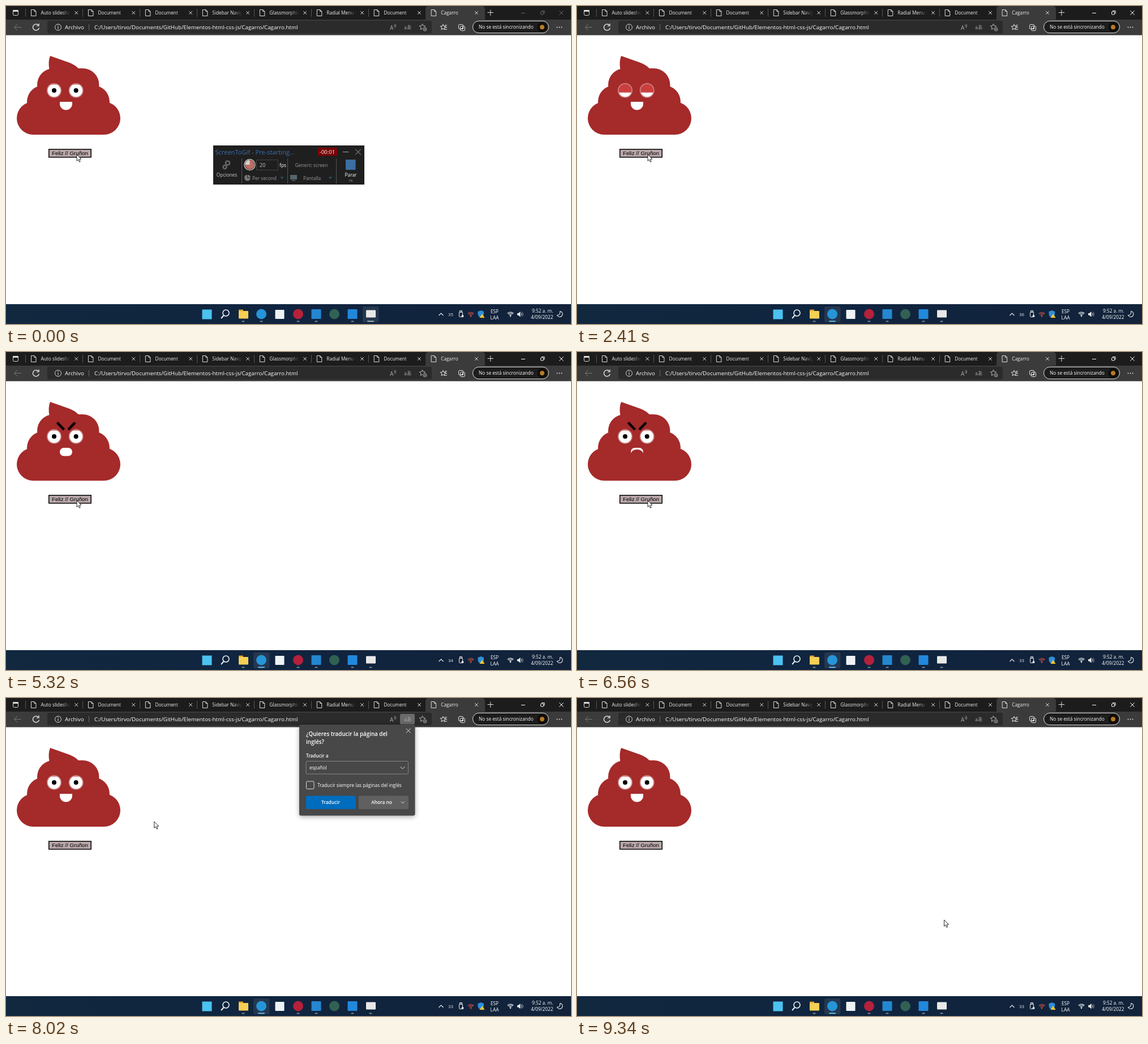
An HTML page with a canvas for the animation above (9.49 s loop, 998x561 px).

```html
<!DOCTYPE html>
<html lang="es">
<head>
<meta charset="utf-8">
<title>Cagarro</title>
<style>
html, body { margin: 0; width: 100%; height: 100%; overflow: hidden; background: #fff; }
canvas { display: block; }
</style>
</head>
<body>
<canvas id="stage" width="998" height="561"></canvas>
<script>
const screen2d = document.getElementById('stage').getContext('2d');
const layer = new OffscreenCanvas(998, 561);
const layer2d = layer.getContext('2d');
let ctx = screen2d;

const LOOP = 9490;
const UI = '"Open Sans", "Noto Sans", sans-serif';
const BROWN = '#a52a2a';
const BLINKS = [2060, 5950, 8690];
const CLICKS = [2960, 6760, 8830];

const clamp = v => Math.max(0, Math.min(1, v));
const ramp = (t, from, to) => clamp((t - from) / (to - from));
const within = (t, from, to) => t >= from && t < to;

function rect(x, y, w, h, fill, r = 0) {
  ctx.beginPath();
  ctx.roundRect(x, y, w, h, r);
  ctx.fillStyle = fill;
  ctx.fill();
}

function frame(x, y, w, h, color, r = 0, lw = 1) {
  ctx.beginPath();
  ctx.roundRect(x, y, w, h, r);
  stroke(color, lw);
}

function stroke(color, lw) {
  ctx.strokeStyle = color;
  ctx.lineWidth = lw;
  ctx.stroke();
}

function disc(x, y, r, fill) {
  ctx.beginPath();
  ctx.arc(x, y, r, 0, 7);
  ctx.fillStyle = fill;
  ctx.fill();
}

function ring(x, y, r, color, lw = 1, a = 0, b = Math.PI * 2) {
  ctx.beginPath();
  ctx.arc(x, y, r, a, b);
  stroke(color, lw);
}

function line(color, lw, ...pts) {
  ctx.beginPath();
  for (let i = 0; i < pts.length; i += 2) ctx.lineTo(pts[i], pts[i + 1]);
  stroke(color, lw);
}

function path(d, fill) {
  ctx.fillStyle = fill;
  ctx.fill(new Path2D(d));
}

function text(s, x, y, color = '#fff', size = 8.3, weight = 400, align = 'left', family = UI) {
  ctx.font = `${weight} ${size}px ${family}`;
  ctx.textAlign = align;
  ctx.fillStyle = color;
  ctx.fillText(s, x, y);
}

function cross(x, y, r, color, lw = 1) {
  line(color, lw, x - r, y - r, x + r, y + r);
  line(color, lw, x + r, y - r, x - r, y + r);
}

function star(x, y, r, color) {
  ctx.beginPath();
  for (let i = 0; i < 10; i++) {
    const a = i * Math.PI / 5 - Math.PI / 2, d = i % 2 ? r * 0.48 : r;
    ctx.lineTo(x + d * Math.cos(a), y + d * Math.sin(a));
  }
  ctx.closePath();
  stroke(color, 1);
}

function wifi(x, y, color) {
  for (const r of [2.5, 5, 7]) ring(x, y, r, color, 1.2, -Math.PI * 0.77, -Math.PI * 0.23);
  disc(x, y, 1.2, color);
}

// Paints a group on its own layer so that it fades as one piece.
function group(alpha, dx, dy, scale, paint) {
  layer2d.clearRect(0, 0, 998, 561);
  ctx = layer2d;
  paint();
  ctx = screen2d;
  ctx.save();
  ctx.globalAlpha = alpha;
  ctx.translate(499.5 + dx, 280.5 + dy);
  ctx.scale(scale, scale);
  ctx.drawImage(layer, -499.5, -280.5);
  ctx.restore();
}

function tabs(t, focused) {
  rect(0, 0, 998, 25, '#1c1c1c');
  frame(12.5, 7.5, 9, 9, '#ddd', 2);
  rect(12, 7, 10, 3, '#ddd', 1);
  rect(741, 0, 105, 25, '#3b3b3b', [5, 5, 0, 0]);
  const names = ['Auto slideshow', 'Document', 'Document', 'Sidebar Navigation',
    'Glassmorphism', 'Radial Menu CSS', 'Document', 'Cagarro'];
  names.forEach((name, i) => {
    const x = i * 100.95;
    if (i < 7) line('#555', 1, Math.round(x + 34) + 0.5, 5, Math.round(x + 34) + 0.5, 19);
    if (i === 7 && within(t, 6870, 7030)) {
      const a = t / 90;
      ring(x + 49, 11.5, 5, '#67b4ef', 1.5, a, a + 4);
    } else {
      line('#ddd', 1, x + 50, 6.5, x + 44.5, 6.5, x + 44.5, 17.5, x + 53, 17.5, x + 53, 9.5, x + 50, 6.5, x + 50, 9.5, x + 53, 9.5);
    }
    const fade = ctx.createLinearGradient(x + 98, 0, x + 114, 0);
    fade.addColorStop(0, '#eee');
    fade.addColorStop(1, 'rgba(238,238,238,0)');
    text(name, x + 61.5, 15, fade);
    cross(x + 124.3, 12, 2.8, '#ddd');
  });
  line('#ddd', 1, 850.5, 11.5, 861, 11.5);
  line('#ddd', 1, 855.8, 6.5, 855.8, 17);
  const c = focused ? '#fff' : '#666';
  line(c, 1, 910, 12.5, 917, 12.5);
  frame(944.5, 10, 5, 5, c, 1);
  line(c, 1, 946, 8.5, 951, 8.5, 951, 13.5);
  cross(981, 12, 3.7, c);
}

function toolbar(t) {
  rect(0, 24, 998, 27.5, '#3b3b3b');
  rect(73, 26, 679, 22.5, '#2b2b2b', 3);
  line('#777', 1, 27, 37.5, 14.5, 37.5);
  line('#777', 1, 20, 32, 14.5, 37.5, 20, 43);
  if (within(t, 6870, 7130)) {
    cross(53, 37.5, 5, '#fff', 1.2);
  } else {
    ring(53, 37.5, 5.5, '#fff', 1.2, 0.2, 5.5);
    line('#fff', 1.2, 58, 31, 58, 35, 54, 35);
  }
  ring(92, 37.5, 5.5, '#ddd');
  line('#ddd', 1.1, 92, 36.5, 92, 40.5);
  line('#ddd', 1.1, 92, 34, 92, 35.2);
  text('Archivo', 104, 41, '#fff', 9.75);
  line('#666', 1, 146.5, 32, 146.5, 43);
  text('C:/Users/tirvo/Documents/GitHub/Elementos-html-css-js/Cagarro/Cagarro.html', 156, 41, '#fff', 9.75);
  text('A', 678, 41.5, '#aaa', 10);
  ring(683.5, 35, 3, '#aaa', 0.8, -0.8, 0.8);
  ring(683.5, 35, 5, '#aaa', 0.8, -0.8, 0.8);
  if (within(t, 7000, 8990)) rect(696, 28, 26, 18.5, '#6a6a6a', 2);
  text('aあ', 703, 40.5, '#aaa', 8.6, 400, 'left', '"Noto Sans CJK JP", "Noto Sans CJK", sans-serif');
  star(735.5, 37, 5.5, '#bbb');
  disc(740, 41, 4, '#2b2b2b');
  ring(740, 41, 3, '#bbb', 0.9);
  line('#bbb', 0.8, 738.5, 41, 741.5, 41);
  line('#bbb', 0.8, 740, 39.5, 740, 42.5);
  star(772, 37.5, 5, '#eee');
  for (const y of [34, 37.5, 41]) line('#eee', 1, 775, y, 779, y);
  frame(799.5, 32.5, 8, 8, '#eee', 2);
  frame(802.5, 35.5, 8, 8, '#eee', 2);
  line('#eee', 1, 804.5, 39.5, 808.5, 39.5);
  line('#eee', 1, 806.5, 37.5, 806.5, 41.5);
  rect(824.5, 26.5, 134, 21, '#1d1d1d', 10.5);
  frame(824.5, 26.5, 134, 21, '#ddd', 10.5);
  text('No se está sincronizando', 835, 40, '#fff', 8.3);
  disc(947, 37.2, 8.5, '#100c08');
  disc(947, 37.2, 4, '#b67b28');
  for (const x of [973.5, 977.5, 981.5]) disc(x, 37.5, 0.9, '#eee');
}

function lidAmount(t) {
  return Math.max(...BLINKS.map(b => Math.min(ramp(t, b, b + 190), 1 - ramp(t, b + 190, b + 610))));
}

function eye(x, y, lid) {
  disc(x, y, 13, '#c98686');
  disc(x, y, 11.3, '#fff');
  disc(x, y, 4, '#000');
  ctx.save();
  ctx.beginPath();
  ctx.arc(x, y, 11.5, 0, 7);
  ctx.clip();
  const edge = y - 10.5 + 23 * lid;
  rect(x - 13, y - 13, 26, edge - y + 13, '#cc3e3e');
  if (lid > 0) line('#dc8080', 1, x - 13, edge - 0.5, x + 13, edge - 0.5);
  ctx.restore();
}

function mouth(angry, t) {
  if (!angry) return rect(95, 169, 22, 14.5, '#fff', [0, 0, 11, 11]);
  const frown = ramp(t, 6000, 6500);
  rect(95, 169, 22, 14.5, '#fff', 7 + 1.5 * frown);
  if (frown > 0) {
    ctx.save();
    ctx.beginPath();
    ctx.rect(94, 168, 24, 17);
    ctx.clip();
    ctx.beginPath();
    ctx.ellipse(106, 191 - 11 * frown, 11, 8, 0, 0, 7);
    ctx.fillStyle = BROWN;
    ctx.fill();
    if (frown > 0.5) rect(94, 179, 24, 6, BROWN);
    ctx.restore();
  }
}

function face(t) {
  const angry = within(t, 3010, 6830);
  path('M78 88 Q74 98 76.5 112 L130 112 Q121 103 112 100 Z', BROWN);
  rect(55, 110, 109.5, 58, BROWN, 29);
  rect(37, 140, 146, 58, BROWN, 29);
  rect(19, 169, 183, 58, BROWN, 29);
  const lid = lidAmount(t);
  eye(85, 149, lid);
  eye(123.7, 149, lid);
  mouth(angry, t);
  if (angry) {
    line('#000', 4.5, 90.5, 124.5, 102.5, 137);
    line('#000', 4.5, 122, 124.5, 110, 137);
  }
}

function button(t) {
  rect(75, 252, 76, 15.6, '#000');
  rect(76.5, 253.5, 73, 12.6, '#b9a7a9');
  text('Feliz // Gruñon', 81, 263, '#000', 9.76, 400, 'left', '"Liberation Sans", Arial, sans-serif');
  if (within(t, 8880, 8990)) line('#000', 1, 145.5, 254, 145.5, 265);
}

function recorderWindow() {
  rect(366, 246, 267, 69, '#1f1f1f');
  text('ScreenToGif - Pre-starting...', 369.5, 262, '#3f6fae', 11.1);
  rect(550, 250, 35, 14.5, '#760206');
  text('-00:01', 567.5, 261, '#fff', 9.5, 400, 'center');
  line('#aaa', 1, 595, 257.5, 605, 257.5);
  cross(622, 257.5, 4.8, '#aaa');
  ring(391.5, 277, 3.6, '#666', 2.5);
  ring(386.5, 284, 3, '#666', 2.5);
  text('Opciones', 390, 301, '#ccc', 8.3, 400, 'center');
  for (const x of [416.5, 497.5, 583.5]) line('#555', 1, x, 269, x, 313);
  ring(430.5, 280, 9.6, '#d8d0cc', 1.2);
  disc(430.5, 280, 8.3, '#be6d63');
  path('M430.5 280 H422.2 A8.3 8.3 0 0 1 430.5 271.7 Z', '#d8d0cc');
  frame(442.5, 271.5, 38, 18, '#444');
  text('20', 448, 283.5, '#ccc', 9);
  text('fps', 483, 283.5, '#fff', 8.5);
  disc(426.5, 303, 5.5, '#777');
  line('#1f1f1f', 1, 426.5, 297, 426.5, 303, 432, 303);
  text('Per second', 435, 306.5, '#999');
  path('M484.5 301.5 h6 l-3 3.5 z M570 301.5 h6 l-3 3.5 z', '#285e78');
  text('Generic screen', 539.5, 283.5, '#999', 8.3, 400, 'center');
  rect(502, 298, 12, 8, '#55656b');
  rect(505, 307, 6, 1.5, '#55656b');
  text('Pantalla', 525, 306.5, '#999');
  rect(600, 271, 17.5, 18, '#3b6ea2');
  text('Parar', 609, 301, '#fff', 8.3, 400, 'center');
  text('F8', 609, 310, '#999', 6, 400, 'center');
}

// Minimises towards the taskbar.
function recorder(t) {
  const p = ramp(t, 50, 340);
  if (p < 1) group(1 - p, 60 * p * p, 150 * p * p, 1 - 0.5 * p * p, recorderWindow);
}

function popupWindow() {
  ctx.save();
  ctx.shadowColor = 'rgba(0,0,0,.35)';
  ctx.shadowBlur = 8;
  ctx.shadowOffsetY = 2;
  rect(518, 47, 204.5, 160.5, '#484848', 3);
  ctx.restore();
  cross(710.7, 57.7, 4, '#ddd');
  text('¿Quieres traducir la página del', 530, 67, '#fff', 9.8, 600);
  text('inglés?', 530, 81, '#fff', 9.8, 600);
  text('Traducir a', 530, 104.5, '#fff', 8.2, 600);
  frame(530, 111.5, 180.5, 22.5, '#858585', 2);
  text('español', 536, 125.5);
  line('#ddd', 1, 696.5, 121, 700.5, 125, 704.5, 121);
  frame(530.5, 147, 13.5, 13.5, '#ddd', 2);
  text('Traducir siempre las páginas del inglés', 550, 157);
  rect(530, 172.5, 87.5, 23.5, '#006cbe', 2);
  text('Traducir', 573.5, 187, '#fff', 8.3, 600, 'center');
  rect(623, 172.5, 88, 23.5, '#606060', 2);
  text('Ahora no', 663.5, 187, '#fff', 8.3, 600, 'center');
  line('#ddd', 1, 697.5, 182.5, 700.7, 185.7, 704, 182.5);
}

function popup(t) {
  const show = ramp(t, 6990, 7160), hide = ramp(t, 8800, 9000);
  const alpha = show * (1 - hide);
  const shift = hide > 0 ? 6.25 * hide : 3 * (1 - show);
  if (alpha > 0) group(alpha, shift, shift, 1, popupWindow);
}

function taskbar(t, focused) {
  const bg = ctx.createLinearGradient(0, 0, 998, 0);
  bg.addColorStop(0, '#11283f');
  bg.addColorStop(0.5, '#10243f');
  bg.addColorStop(1, '#12233a');
  rect(0, 526, 998, 35, bg);
  const active = focused ? 451 : 644;
  rect(active - 14, 530, 28.5, 28, 'rgba(255,255,255,.09)', 3);
  rect(346.5, 535.5, 17, 17, '#4cc2f1');
  ring(388.5, 541.5, 5.5, '#e8eef2', 1.6);
  line('#e8eef2', 2, 384.5, 546, 380, 551);
  rect(411, 535.5, 8, 5, '#e0a528', 1);
  rect(411, 538, 17, 13.5, '#f8cf55', 1);
  disc(451, 543.5, 9, '#2695d8');
  rect(475.5, 536, 16, 16, '#eef2f5', 1);
  disc(516, 543.5, 9, '#b5213a');
  rect(539.5, 535, 17, 17, '#2487d0', 1);
  disc(580, 543.5, 9, '#306153');
  rect(603.5, 535, 17, 17, '#2188dc', 1);
  rect(636, 536.5, 17, 13, '#e8e8e8', 1);
  for (const x of [419, 451, 516, 548, 612, 644]) {
    if (x !== active) rect(x - 2.5, 555.5, 5, 1.8, '#8793a0', 1);
  }
  rect(active - 6, 555.3, 12, 2, focused ? '#64bce8' : '#a5b2bc', 1);
  tray(t);
}

function tray(t) {
  line('#eee', 1.1, 764.5, 546, 768.5, 542, 772.5, 546);
  const temp = t < 100 ? 35 : t < 3340 ? 36 : within(t, 5320, 6200) ? 34 : 33;
  text(temp, 781, 546.8, '#eee', 7.8);
  frame(800.5, 540, 6, 8.5, '#eee', 1);
  frame(801.5, 537.5, 4, 2.5, '#eee');
  disc(806.5, 547, 2, '#eee');
  wifi(821, 547.5, '#cf5144');
  path('M833.5 539 L839 537 L844 539 V543 Q844 548 839 550 Q833.5 548 833.5 543 Z', '#2d8fd8');
  path('M841 543 L845.5 550 H836.5 Z', '#f5c533');
  text('ESP', 863, 541.5, '#fff', 8.3, 400, 'center');
  text('LAA', 863, 553, '#fff', 8.3, 400, 'center');
  wifi(891, 547, '#eee');
  path('M903 542 h2 l3.5 -3 v9.5 l-3.5 -3 h-2 z', '#eee');
  ring(907.5, 543.8, 3.5, '#eee', 1, -0.8, 0.8);
  ring(907.5, 543.8, 5.8, '#8d99a6', 1, -0.8, 0.8);
  text('9:52 a. m.', 966.5, 541, '#fff', 8.3, 400, 'right');
  text('4/09/2022', 966.5, 552, '#fff', 8.3, 400, 'right');
  ctx.beginPath();
  ctx.arc(978, 543.5, 5, -1.5, 2.7);
  ctx.quadraticCurveTo(980, 545, 978.4, 538.5);
  stroke('#eee', 1.1);
}

function pointer(t) {
  if (t < 8020) return [125, 262];
  const u = 1 - (1 - ramp(t, 8020, 8780)) ** 3, v = 1 - u;
  const curve = (a, b, c) => a * v * v + 2 * b * u * v + c * u * u;
  return [curve(260.5, 420, 648.5), curve(218, 215, 391.5)];
}

function cursor(t) {
  const [x, y] = pointer(t);
  if (CLICKS.some(c => within(t, c, c + 100))) disc(x, y, 9, 'rgba(255,255,60,.7)');
  const arrow = new Path2D('M0 0 V11.3 L2.6 9 L4.4 13.2 L6.2 12.4 L4.5 8.3 L8 8 Z');
  ctx.save();
  ctx.translate(x, y);
  ctx.fillStyle = '#fff';
  ctx.fill(arrow);
  ctx.strokeStyle = '#111';
  ctx.lineWidth = 0.9;
  ctx.stroke(arrow);
  ctx.restore();
}

function draw(now) {
  const t = now % LOOP, focused = t >= 50;
  rect(0, 0, 998, 561, '#fff');
  face(t);
  button(t);
  tabs(t, focused);
  toolbar(t);
  taskbar(t, focused);
  popup(t);
  recorder(t);
  cursor(t);
}

const start = performance.now();
function tick() {
  draw(performance.now() - start);
  requestAnimationFrame(tick);
}
tick();
</script>
</body>
</html>
```
